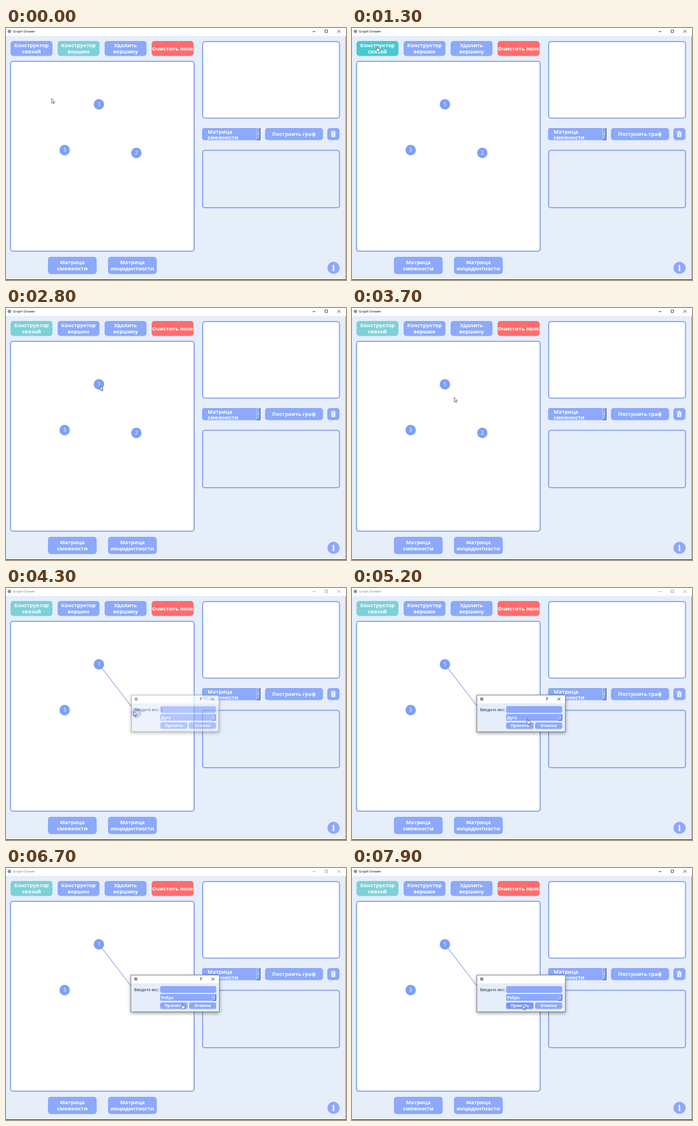
An HTML page that plays this animation: 600 px wide and 446 px high, repeating every 8000 ms.

```html
<!DOCTYPE html>
<html lang="ru">
<head>
<meta charset="utf-8">
<style>
  html, body { margin: 0; width: 100%; height: 100%; overflow: hidden; }
  svg { display: block; width: 100vw; height: 100vh; font-family: "Noto Sans", "Open Sans", sans-serif; }
  .label { font-weight: 700; fill: #fff; }
  .frame { stroke: #8ba8ee; stroke-width: 2; }
</style>
</head>
<body>
<svg id="stage" viewBox="0 0 600 446"></svg>
<script>
const BLUE = '#8ca9fb', BLUE_HOVER = '#7898f8', TEAL = '#7dd1d7', TEAL_HOVER = '#48cad2';
const RED = '#ff6c6c', PAPER = '#e6eefa', DURATION = 8000, STEP = 100;

const rect = (x, y, w, h, r, fill, extra = '') =>
  `<rect x="${x}" y="${y}" width="${w}" height="${h}" rx="${r}" fill="${fill}" ${extra}/>`;
const text = (x, y, size, content, extra = '') =>
  `<text x="${x}" y="${y}" font-size="${size}" ${extra}>${content}</text>`;
const middle = 'class="label" text-anchor="middle"';

function button(x, y, w, h, lines, { id = '', size = 9.2, fill = BLUE, r = 5 } = {}) {
  const first = y + h / 2 + size * 0.36 - (lines.length - 1) * 5.5;
  return rect(x, y, w, h, r, fill, id && `id="${id}"`) +
    lines.map((line, i) => text(x + w / 2, first + i * 11, size, line, middle)).join('');
}

const node = (x, y, name) =>
  `<circle cx="${x}" cy="${y}" r="9.2" fill="#7d9ff8"/>` +
  text(x, y + 3.3, 9, name, 'fill="#fff" text-anchor="middle"');

const cross = (x, y, size) =>
  `<path d="M${x} ${y}l${size} ${size}m0 ${-size}l${-size} ${size}"/>`;

const titleBar =
  rect(0, 0, 600, 14, 0, '#fff') +
  `<circle cx="6" cy="6" r="3" fill="#7f93ab"/>
  <g id="title">${text(12, 8.2, 6, 'Graph Drawer', 'fill="#111"')}
    <g fill="none" stroke="#222" stroke-width=".8"><path d="M541 6.5h5M563 3.5h4.5v4.5h-4.5z"/>${cross(585, 3.5, 5)}</g>
  </g>`;

const trash =
  `<g fill="#fff"><path d="M573 183.2h9v1.4h-9zM576 182h3v1.2h-3zM573.7 185.4h7.6l-.5 7.3h-6.6z"/>
  <path d="M576 187v4.2m1.5-4.2v4.2m1.5-4.2v4.2" stroke="${BLUE}" stroke-width=".6"/></g>`;

const mainWindow =
  rect(0, 0, 600, 446, 0, PAPER) + titleBar +
  button(8, 23, 74, 26.5, ['Конструктор', 'связей'], { id: 'edges' }) +
  button(91, 23, 74, 26.5, ['Конструктор', 'вершин'], { id: 'vertices' }) +
  button(174, 23, 74, 26.5, ['Удалить', 'вершину']) +
  button(257, 23, 74, 26.5, ['Очистить поле'], { fill: RED }) +
  rect(8, 59, 324, 336, 4, '#fff', 'class="frame"') +
  rect(347, 24, 241.5, 135.5, 4, '#fff', 'class="frame"') +
  rect(347, 216.5, 241.5, 101.5, 4, PAPER, 'class="frame"') +
  rect(346, 177, 103, 21.5, 4, BLUE) +
  text(356, 186.6, 9.2, 'Матрица', 'class="label"') +
  text(356, 196.8, 9.2, 'смежности', 'class="label"') +
  `<path d="M442.5 177.5v20.5" stroke="#b9cafd"/><path d="M448.5 177v21h-6" fill="none" stroke="#3c4a78"/>
  <path d="M443.8 187h3l-1.5 1.8z" fill="#fff"/>` +
  button(457, 177, 102.5, 21.5, ['Построить граф']) +
  rect(567, 177, 21.5, 21.5, 5, BLUE) + trash +
  button(74, 405, 86, 30.5, ['Матрица', 'смежности']) +
  button(180, 405, 86, 30.5, ['Матрица', 'инцидентности']) +
  `<circle cx="578" cy="424.5" r="10.7" fill="${BLUE}"/>` +
  text(578, 429.5, 14, 'i', 'font-family="DejaVu Serif, serif" font-weight="700" fill="#fff" text-anchor="middle"') +
  `<path id="link" d="M164 135L230 221" stroke="#6480d6"/>` +
  node(164, 135, 1) + node(230, 221, 2) + node(103.5, 216, 3) +
  `<path d="M599.5 14v432" stroke="#8b93a3"/><path d="M0 445.5h600" stroke="#1a2030"/>`;

const popup =
  `<g id="popup">${rect(272, 235, 99, 14.5, 1, BLUE)}${rect(273, 234.5, 97, 4.5, 0, '#dfe4ee')}
  <svg x="272" y="234" width="99" height="6" viewBox="272 234 99 6">${text(275, 238.6, 7.2, 'Дуга', 'font-weight="700" fill="#111"')}</svg>
  ${text(275, 246.3, 7.2, 'Ребро', 'class="label"')}<path d="M319 249.5h5l-2.5-1.8z" fill="#fff"/></g>`;

const dialog =
  `<g id="dialog">
  <g filter="url(#shadow)">${rect(220.5, 189.5, 156, 65, 0, PAPER, 'stroke="#7a828f"')}</g>
  ${rect(221, 190, 155, 14, 0, '#fff')}
  <circle cx="229" cy="196.5" r="3" fill="#7f93ab"/>
  <g id="dialogControls">${text(344, 199, 7.5, '?', 'fill="#111" font-weight="700" text-anchor="middle"')}
  <g stroke="#222" stroke-width=".9">${cross(362.7, 194, 5)}</g></g>
  ${text(226, 217.6, 7.2, 'Введите вес:', 'fill="#26324d"')}
  ${rect(272, 209, 99, 12, 3, BLUE)}
  <path id="caret" d="M274.5 210.5v8.5" stroke="#33406a" stroke-width=".7"/>
  ${rect(272, 223, 99, 12, 2, BLUE)}
  <path d="M364.5 223.5v11" stroke="#b9cafd" stroke-width=".7"/><path d="M370.5 223.5v11h-6" fill="none" stroke="#3c4a78" stroke-width=".8"/>
  <path d="M365.8 228.6h3l-1.5 1.8z" fill="#fff"/>
  <text id="choice" class="label" x="273.5" y="231.7" font-size="7.2"></text>
  ${button(272, 238, 48.5, 11.5, ['Принять'], { id: 'accept', size: 7.2, r: 3 })}
  ${button(323, 238, 48, 11.5, ['Отмена'], { size: 7.2, r: 3 })}
  ${popup}</g>`;

const cursors =
  `<g id="cursor" fill="#fff" stroke="#333" stroke-width=".7" stroke-linejoin="round">
  <path id="arrow" d="M0 0v8l1.8-1.7 1.3 2.9 1.2-.5-1.3-2.8h2.5z"/>
  <path id="hand" d="M-.8 .6q.8-1.2 1.6 0v3.2l3.3.8q1 .4.7 1.7l-.7 3.2h-4l-2.6-3.5q.1-1.2 1.7-.2z"/></g>`;

const stage = document.getElementById('stage');
stage.innerHTML =
  `<defs><filter id="shadow" x="-10%" y="-15%" width="120%" height="140%">
  <feDropShadow dx="0" dy="2" stdDeviation="3" flood-color="#000" flood-opacity=".4"/></filter></defs>` +
  mainWindow + dialog + cursors;

const el = Object.fromEntries([...stage.querySelectorAll('[id]')].map(e => [e.id, e]));

// Pointer stops: time, x, y
const path = [
  [0, 80.7, 125], [300, 76, 94], [600, 76, 94], [1000, 44.5, 32], [1300, 44.5, 32],
  [1800, 143, 108], [2100, 164, 135], [2400, 166.3, 138], [2800, 166.3, 138],
  [3600, 172, 147], [4000, 225.5, 218.5], [4300, 225.5, 218.5], [5000, 310, 231],
  [6300, 310, 231], [6600, 311, 240], [6900, 311, 240], [7300, 301.5, 242.5], [DURATION, 301.5, 242.5]
];

function pointerAt(t) {
  const i = path.findIndex(p => p[0] > t);
  const [t0, x0, y0] = path[i - 1], [t1, x1, y1] = path[i];
  const u = (t - t0) / (t1 - t0), k = u * u * (3 - 2 * u);
  return [x0 + (x1 - x0) * k, y0 + (y1 - y0) * k];
}

const within = (t, from, to) => t >= from && t < to;
const show = (element, visible) => element.setAttribute('visibility', visible ? 'inherit' : 'hidden');

function render(t) {
  const [x, y] = pointerAt(t);
  const overEdges = x < 82 && y < 50, linking = t >= 1300;
  const modal = within(t, 4200, 7900);

  el.edges.setAttribute('fill', linking ? (overEdges ? TEAL_HOVER : TEAL) : (overEdges ? BLUE_HOVER : BLUE));
  el.vertices.setAttribute('fill', linking ? BLUE : TEAL);
  el.title.setAttribute('opacity', modal ? 0.5 : 1);
  show(el.link, t >= 4200);

  const opening = Math.min(1, Math.max(0, (t - 4100) / 300));
  const scale = 0.97 + 0.03 * opening;
  show(el.dialog, t >= 4200);
  el.dialog.setAttribute('opacity', opening);
  el.dialog.setAttribute('transform', `translate(298.5 222) scale(${scale}) translate(-298.5 -222)`);
  show(el.dialogControls, modal);
  show(el.caret, within(t, 4200, 4700) || within(t, 5300, 5800));
  show(el.popup, within(t, 6000, 6700));
  el.choice.textContent = t < 6700 ? 'Дуга' : 'Ребро';
  el.accept.setAttribute('fill', t >= 7100 ? BLUE_HOVER : BLUE);

  const hand = overEdges || within(t, 4700, 7900);
  show(el.hand, hand);
  show(el.arrow, !hand);
  el.cursor.setAttribute('transform', `translate(${x} ${y})`);
}

function tick(now) {
  render(Math.floor((now % DURATION) / STEP) * STEP);
  requestAnimationFrame(tick);
}
render(0);
requestAnimationFrame(tick);
</script>
</body>
</html>
```
